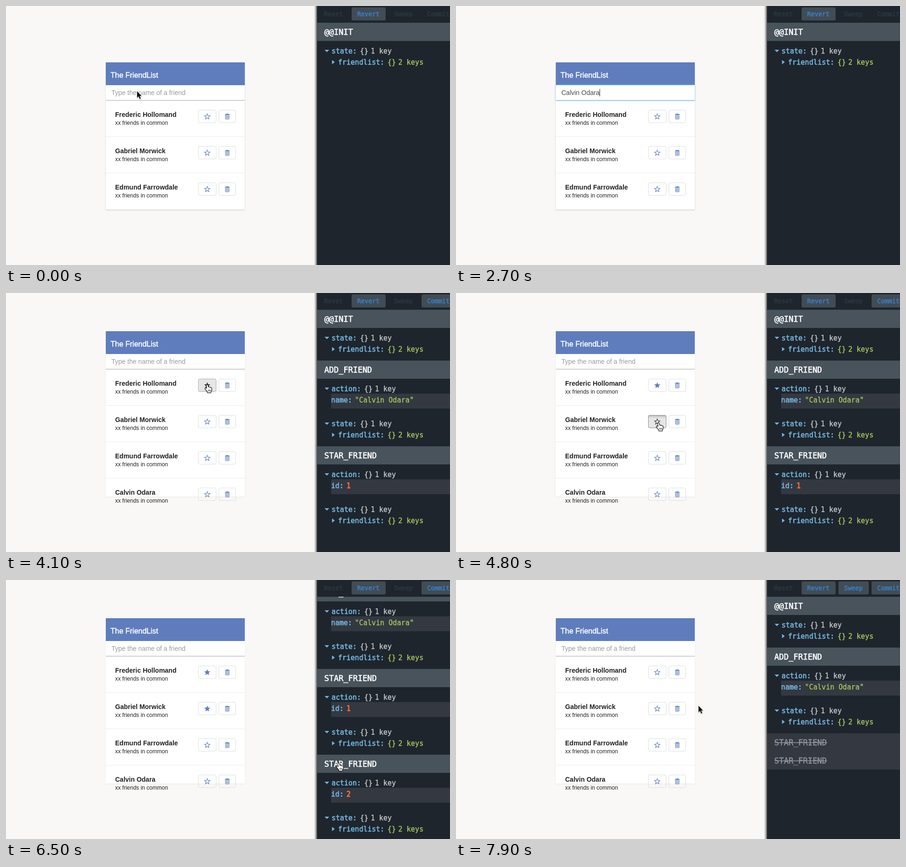
Animation of 952 by 556 pixels, one loop 8000 ms. Source, as an HTML page with a canvas:

```html
<!DOCTYPE html>
<html lang="en">
<head>
<meta charset="utf-8">
<title>Friend list with action log</title>
<style>
html, body { margin: 0; width: 100%; height: 100%; overflow: hidden; background: #f9f8f6; }
canvas { display: block; width: 952px; height: 556px; }
</style>
</head>
<body>
<canvas id="stage"></canvas>
<script>
const W = 952, H = 556, LOOP = 8000, STEP = 100;
const canvas = document.getElementById('stage');
const ratio = window.devicePixelRatio || 1;
canvas.width = W * ratio;
canvas.height = H * ratio;
const ctx = canvas.getContext('2d');
ctx.scale(ratio, ratio);

const SANS = '"Liberation Sans", Arial, sans-serif';
const MONO = '"DejaVu Sans Mono", monospace';
const BLUE = '#5f7dbd', LABEL = '#74b5dc', GREEN = '#a9c95c', GREY = '#c8cacc', ORANGE = '#f87238';
const PANEL = 667, BAR = 36;

const friends = ['Frederic Hollomand', 'Gabriel Morwick', 'Edmund Farrowdale', 'Calvin Odara'];
const newName = friends[3];
const keyTimes = [1000, 1100, 1300, 1400, 1700, 1900, 2100, 2200, 2300, 2400, 2600, 2700];
const FOCUS = 400, ADD = 2900, BLUR = 3900, STAR1 = 4000, STAR2 = 4900, UNDO2 = 6700, UNDO1 = 7500;
const presses = [[3900, 4000], [4800, 4900]];

// time, x, y of the pointer's hot spot
const track = [
  [0, 281, 183], [3000, 281, 183], [3500, 411, 207], [3800, 430, 197], [4200, 430, 197],
  [4600, 433, 279], [5400, 433, 279], [6300, 712, 393], [6800, 712, 393],
  [7200, 719, 350], [7500, 719, 350], [7900, 520, 270], [LOOP, 520, 270]
];

function pointerAt(t) {
  let i = 1;
  while (t > track[i][0]) i++;
  const [t0, x0, y0] = track[i - 1], [t1, x1, y1] = track[i];
  const u = (t - t0) / (t1 - t0), k = u * u * (3 - 2 * u);
  return { x: x0 + (x1 - x0) * k, y: y0 + (y1 - y0) * k };
}

function rect(x, y, w, h, color) {
  ctx.fillStyle = color;
  ctx.fillRect(x, y, w, h);
}

// extra thickens the letters without changing their widths
function text(str, x, y, font, color, extra = 0) {
  ctx.font = font;
  ctx.fillStyle = color;
  ctx.fillText(str, x, y);
  if (extra) {
    ctx.strokeStyle = color;
    ctx.lineWidth = extra;
    ctx.lineJoin = 'round';
    ctx.strokeText(str, x, y);
  }
}

function poly(points) {
  ctx.beginPath();
  points.forEach(([x, y]) => ctx.lineTo(x, y));
  ctx.closePath();
}

function round(x, y, w, h, r) {
  ctx.beginPath();
  ctx.roundRect(x, y, w, h, r);
}

function star(x, y, full, color) {
  const size = full ? 7 : 6.2, points = [];
  for (let i = 0; i < 10; i++) {
    const a = i * Math.PI / 5 - Math.PI / 2, r = i % 2 ? size * 0.43 : size;
    points.push([x + r * Math.cos(a), y + r * Math.sin(a)]);
  }
  poly(points);
  ctx.lineJoin = 'miter';
  ctx.lineWidth = 1.1;
  ctx.fillStyle = ctx.strokeStyle = color;
  full ? ctx.fill() : ctx.stroke();
}

function trash(x, y) {
  rect(x - 2, y - 6, 4, 1, BLUE);
  rect(x - 5, y - 5, 10, 1.5, BLUE);
  ctx.strokeStyle = BLUE;
  ctx.lineWidth = 1;
  round(x - 4, y - 3, 8, 9, 1);
  ctx.stroke();
  for (const dx of [-2, 0, 2]) rect(x + dx - 0.5, y - 2, 1, 7, BLUE);
}

function button(x, y, w, state) {
  const active = state === 'active';
  if (state) {
    round(x, y, w, 28, 4);
    ctx.fillStyle = '#e6e6e6';
    ctx.fill();
  }
  if (active) {
    const shade = ctx.createLinearGradient(0, y, 0, y + 7);
    shade.addColorStop(0, 'rgba(0,0,0,.2)');
    shade.addColorStop(1, 'rgba(0,0,0,0)');
    ctx.fillStyle = shade;
    ctx.fill();
  }
  round(x + 0.5, y + 0.5, w - 1, 27, 3.5);
  ctx.lineWidth = 1;
  ctx.strokeStyle = active ? '#8c8c8c' : state ? '#adadad' : '#dcdee2';
  ctx.stroke();
}

function drawInput(t, top) {
  const y = top + 49, focused = t >= FOCUS && t < BLUR;
  if (focused) {
    ctx.save();
    ctx.shadowColor = 'rgba(102,175,233,.6)';
    ctx.shadowBlur = 4;
    rect(214, y - 1, 298, 34, '#66afe9');
    ctx.restore();
    rect(214, y, 298, 32, '#fff');
  } else {
    rect(214, y + 32, 298, 1, '#a6a6a6');
  }
  const typed = t < ADD ? newName.slice(0, keyTimes.filter(k => k <= t).length) : '';
  const font = '14px ' + SANS;
  text(typed || 'Type the name of a friend', 226, y + 21, font, typed ? '#484848' : '#999');
  if (focused && t < ADD && (typed || t % 1000 < 500 + FOCUS)) {
    rect(226 + (typed ? ctx.measureText(typed).width : 0), y + 8, 1, 16, '#222');
  }
}

function drawCard(t, pointer) {
  const added = t >= ADD, top = added ? 82 : 121;
  ctx.save();
  ctx.shadowColor = added ? 'rgba(0,0,0,.06)' : 'rgba(0,0,0,.2)';
  ctx.shadowBlur = 2;
  ctx.shadowOffsetY = 0.5;
  rect(214, top, 298, 437 - top, '#fff');
  ctx.restore();
  rect(214, top, 298, 49, BLUE);
  text('The FriendList', 224, top + 33, '16px ' + SANS, '#fff', 0.45);
  drawInput(t, top);

  const starred = [t >= STAR1 && t < UNDO1, t >= STAR2 && t < UNDO2];
  friends.slice(0, added ? 4 : 3).forEach((name, i) => {
    const y = top + 82 + i * 78;
    if (i) rect(214, y - 1, 298, 1, '#ececec');
    text(name, 234, y + 35, 'bold 14px ' + SANS, '#222');
    text('xx friends in common', 234, y + 52, '12px ' + SANS, '#222');
    const over = pointer.x >= 412 && pointer.x < 451 && pointer.y >= y + 20 && pointer.y < y + 48;
    const down = presses[i] && t >= presses[i][0] && t < presses[i][1];
    button(412, y + 20, 39, down ? 'active' : over ? 'hover' : '');
    star(431.5, y + 34.5, starred[i], over ? '#333' : BLUE);
    button(456, y + 20, 37, '');
    trash(474.5, y + 34);
  });
}

function triangle(x, y, open) {
  poly(open ? [[x, y], [x + 10, y], [x + 5, y + 5]] : [[x, y], [x + 6, y + 4.5], [x, y + 9]]);
  ctx.fillStyle = LABEL;
  ctx.fill();
}

function node(label, keys, x, y, color) {
  const font = '15px ' + MONO, next = x + label.length * 9 + 7;
  text(label, x, y, font, LABEL, 0.7);
  text('{}', next, y, font, color, 0.35);
  text(keys, next + 23, y, font, color, 0.35);
}

function stateTree(y) {
  triangle(683, y - 3, true);
  node('state:', '1 key', 698, y + 5, GREY);
  triangle(699, y + 19, false);
  node('friendlist:', '2 keys', 712, y + 29, GREEN);
}

function actionTree(y, key, value, color, extra) {
  triangle(683, y - 3, true);
  node('action:', '1 key', 698, y + 5, GREY);
  rect(697, y + 10, W - 697, 32, '#343841');
  text(key, 697, y + 29, '15px ' + MONO, LABEL, 0.7);
  text(value, 697 + key.length * 9 + 6, y + 29, '15px ' + MONO, color, extra);
}

function logEntries(t) {
  const list = [{ title: '@@INIT', h: 109 }];
  if (t >= ADD) list.push({ title: 'ADD_FRIEND', key: 'name:', value: `"${newName}"`, color: GREEN, extra: 0.35 });
  [[STAR1, UNDO1], [STAR2, UNDO2]].forEach(([from, undo], i) => {
    if (t >= from) list.push({ title: 'STAR_FRIEND', key: 'id:', value: String(i + 1), color: ORANGE, extra: 0.9, off: t >= undo });
  });
  let y = BAR - (t >= STAR2 && t < UNDO2 ? 138 : 0);
  for (const e of list) {
    e.y = y;
    y += e.h || (e.off ? 39 : 184);
  }
  return list;
}

function drawEntry({ title, key, value, color, extra, off, y }) {
  const font = '17px ' + MONO;
  rect(PANEL, y, W - PANEL, 39, off ? '#343841' : '#48535c');
  text(title, 682.5, y + 26, font, off ? '#92969c' : '#fff', off ? 0.35 : 0.6);
  if (off) {
    rect(683, y + 19.5, ctx.measureText(title).width, 1.5, '#92969c');
    return;
  }
  if (key) actionTree(y + 61, key, value, color, extra);
  stateTree(y + (key ? 136 : 61));
}

function barButton(label, x, w, on) {
  if (on) {
    round(x, 3, w, 28, 3);
    ctx.fillStyle = '#414c55';
    ctx.fill();
  }
  text(label, x + 12, 22, '13.3px ' + MONO, on ? '#3c7cc0' : '#2d3640', 0.7);
}

function drawPanel(t, entries) {
  const shade = ctx.createLinearGradient(PANEL - 7, 0, PANEL, 0);
  shade.addColorStop(0, 'rgba(0,0,0,0)');
  shade.addColorStop(0.4, 'rgba(0,0,0,.15)');
  shade.addColorStop(1, 'rgba(0,0,0,.65)');
  rect(PANEL - 7, 0, 7, H, shade);
  rect(PANEL, 0, W - PANEL, H, '#1e252d');
  ctx.save();
  ctx.beginPath();
  ctx.rect(PANEL, BAR, W - PANEL, H - BAR);
  ctx.clip();
  entries.forEach(drawEntry);
  ctx.restore();
  barButton('Reset', 670, 64, false);
  barButton('Revert', 741, 73, true);
  barButton('Sweep', 820, 65, t >= UNDO2);
  barButton('Commit', 891, 73, t >= ADD);
}

const arrowShape = [[0, 0], [0, 14], [3.2, 11], [5.6, 16.5], [8, 15.4], [5.6, 10.2], [9.8, 10.2]];
const handShape = [
  [0, 1], [1.2, 0], [2.5, 1], [3.2, 5.6], [4.6, 4.8], [6, 6], [7.4, 5.4], [8.5, 6.8],
  [10, 6.6], [10.8, 8.2], [10.4, 12], [9, 14.5], [9, 16.5], [2.5, 16.5], [2, 14.3],
  [-1.5, 10], [-3, 7.8], [-2, 6.7], [0.9, 8.4]
];

function drawPointer({ x, y }, hand) {
  ctx.save();
  ctx.translate(x, y);
  ctx.shadowColor = 'rgba(0,0,0,.3)';
  ctx.shadowBlur = 2;
  ctx.shadowOffsetY = 1;
  ctx.lineJoin = 'round';
  ctx.lineWidth = hand ? 2.2 : 1.4;
  ctx.strokeStyle = hand ? '#111' : '#fff';
  ctx.fillStyle = hand ? '#fff' : '#111';
  poly(hand ? handShape : arrowShape);
  ctx.stroke();
  ctx.shadowColor = 'transparent';
  ctx.fill();
  if (hand) for (const dx of [3.4, 5.5, 7.6]) rect(dx, 10.5, 0.9, 3.5, '#111');
  ctx.restore();
}

function draw(t) {
  const pointer = pointerAt(t), entries = logEntries(t);
  const hidden = t >= keyTimes[0] && t < 3000;
  rect(0, 0, W, H, '#f9f8f6');
  drawCard(t, pointer);
  drawPanel(t, entries);
  if (hidden) return;
  const { x, y } = pointer;
  const overTitle = x > PANEL && entries.some(e => y >= e.y && y < e.y + 39);
  const overStar = x >= 412 && x < 451 && y >= 184 && (y - 184) % 78 < 28;
  drawPointer(pointer, overTitle || overStar);
}

const start = performance.now();
function tick() {
  const t = (performance.now() - start) % LOOP;
  draw(Math.floor(t / STEP) * STEP);
  requestAnimationFrame(tick);
}
tick();
</script>
</body>
</html>
```
